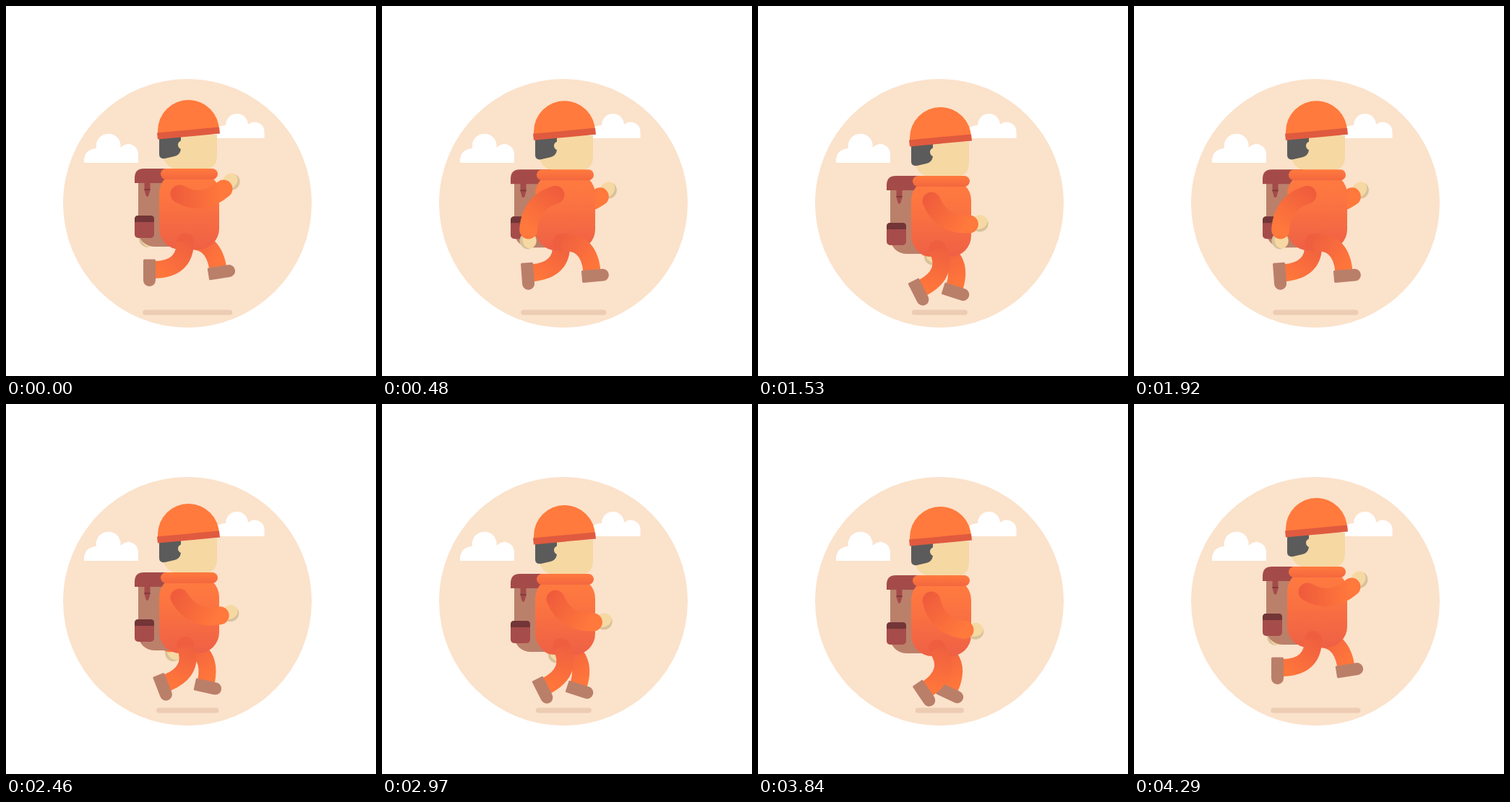
An HTML page for the animation above (4.32 s loop, 512 by 512 pixels).

```html
<!DOCTYPE html>
<html lang="en">
<head>
<meta charset="utf-8">
<title>Running hiker</title>
<style>
  html, body { margin: 0; width: 100%; height: 100%; overflow: hidden; background: #fff; }
  svg { display: block; width: 100vw; height: 100vh; }
</style>
</head>
<body>
<svg viewBox="0 0 512 512">
  <defs>
    <linearGradient id="coat" x1="0" y1="0" x2="0" y2="1">
      <stop offset="0" stop-color="#ff7c3f"/>
      <stop offset=".35" stop-color="#fc7441"/>
      <stop offset="1" stop-color="#ee6045"/>
    </linearGradient>
    <linearGradient id="collar" x1="0" y1="0" x2="0" y2="1">
      <stop offset="0" stop-color="#ff7a3d"/>
      <stop offset="1" stop-color="#f4673f"/>
    </linearGradient>
    <linearGradient id="sleeve" gradientUnits="userSpaceOnUse" x1="232" y1="260" x2="298" y2="256">
      <stop offset="0" stop-color="#ef5c3c"/>
      <stop offset="1" stop-color="#ff783c"/>
    </linearGradient>
    <linearGradient id="trouser" gradientUnits="userSpaceOnUse" x1="250" y1="322" x2="210" y2="368">
      <stop offset="0" stop-color="#ef5f3f"/>
      <stop offset="1" stop-color="#ff763b"/>
    </linearGradient>

    <g id="arm">
      <g transform="translate(312 243)">
        <circle r="11.5" fill="#f6d8a3"/>
        <path d="M5.75-9.96A11.5 11.5 0 0 1-5.75 9.96A12.5 12.5 0 0 0 5.75-9.96Z" fill="#d8c29b"/>
      </g>
      <path d="M240 260Q272 278 301 253" fill="none" stroke="url(#sleeve)" stroke-width="25" stroke-linecap="round"/>
    </g>

    <g id="leg">
      <circle cx="248" cy="326" r="12" fill="#ef5f3f"/>
      <path d="M248 326Q248 364 206 365" fill="none" stroke="url(#trouser)" stroke-width="24"/>
      <path d="M191.500 350.500H205.500Q207 350.500 207 352V379.500A8.500 8.500 0 0 1 190 379.500V352Q190 350.500 191.500 350.500Z" fill="#ba7f69"/>
    </g>
  </defs>

  <circle cx="251" cy="273" r="172" fill="#fbe2cb"/>

  <g fill="#fff">
    <path d="M108 217V213Q109 198 125 197A17 17 0 1 1 158.500 196A14 14 0 0 1 183 207V217Z"/>
    <path d="M286 183V179Q288 166 304 165A15.500 15.500 0 1 1 335 164A13.500 13.500 0 0 1 357.500 174V183Z"/>
  </g>

  <rect id="shadow" y="420.500" height="7" rx="3.500" fill="#ecccb2"/>

  <g id="hiker">
    <use id="farArm" href="#arm"/>
    <use id="farLeg" href="#leg"/>

    <g id="pack">
      <path d="M183 235H245V333H205A22 22 0 0 1 183 311Z" fill="#bb806a"/>
      <path d="M178 245V238Q178 225 191 225H235V245Z" fill="#a44b4a"/>
      <path d="M191.500 244H199.500V255L197.500 262Q195.500 266 193.500 262L191.500 255Z" fill="#a44b4a"/>
      <rect x="191.500" y="253" width="8" height="2" fill="#813a3b"/>
      <rect x="178" y="290" width="27" height="31" rx="5" fill="#a64c4b"/>
      <path d="M178 299V295Q178 290 183 290H200Q205 290 205 295V299Z" fill="#733537"/>
    </g>

    <g id="head">
      <path d="M216 178H292V207Q292 226 273 226H238Q222 225 217 208Z" fill="#f6d8a3"/>
      <path d="M212 181L242 178V186.500Q238 188 238 192T242 198Q241 206 233 208L220 211Q212 212 212 205Z" fill="#5b5b5b"/>
      <path d="M210 177V172.500A42.500 42.500 0 0 1 295 172.500V173Z" fill="#ff7a3c"/>
      <path d="M209 175.500L295 167.500L296 176.500L210 184.500Z" fill="#e05a3f"/>
    </g>

    <rect x="212" y="230" width="83" height="107" rx="29" fill="url(#coat)"/>
    <rect x="214" y="225" width="79" height="15" rx="7.500" fill="url(#collar)"/>

    <use id="nearLeg" href="#leg"/>
    <use id="nearArm" href="#arm"/>
  </g>
</svg>

<script>
  const STRIDE = 20;        // poses per half cycle
  const ARM_SWING = 140;
  const LEG_SWING = -99;

  const byId = id => document.getElementById(id);
  const [hiker, shadow, nearArm, farArm, nearLeg, farLeg] =
    ["hiker", "shadow", "nearArm", "farArm", "nearLeg", "farLeg"].map(byId);

  const easeOut = p => 1 - (1 - p) ** 3;
  const place = (el, value) => el.setAttribute("transform", value);
  const arm = a => `rotate(${a * ARM_SWING} 240 260)`;
  const leg = a => `rotate(${a * LEG_SWING} 248 326)`;

  // Five poses every 180 ms; the first one is held twice as long.
  function poseAt(ms) {
    const tick = Math.floor(ms / 30 + 1e-6);
    return 5 * Math.floor(tick / 6) + Math.max(0, tick % 6 - 1);
  }

  function draw(ms) {
    const pose = poseAt(ms % 4320) % (2 * STRIDE);
    const eased = easeOut(pose % STRIDE / STRIDE);
    const swing = pose < STRIDE ? eased : 1 - eased;
    const dip = Math.max(0, Math.sin(Math.PI * swing)) ** 1.2;

    place(hiker, `translate(0 ${14 * dip})`);
    place(nearArm, arm(swing));
    place(farArm, `translate(0 3) ${arm(1 - swing)}`);
    place(nearLeg, leg(swing));
    place(farLeg, leg(1 - swing));

    const width = 124 - 66 * dip;
    shadow.setAttribute("x", 251.3 - width / 2);
    shadow.setAttribute("width", width);
  }

  const start = performance.now();
  function loop() {
    draw(performance.now() - start);
    requestAnimationFrame(loop);
  }
  loop();
</script>
</body>
</html>
```
